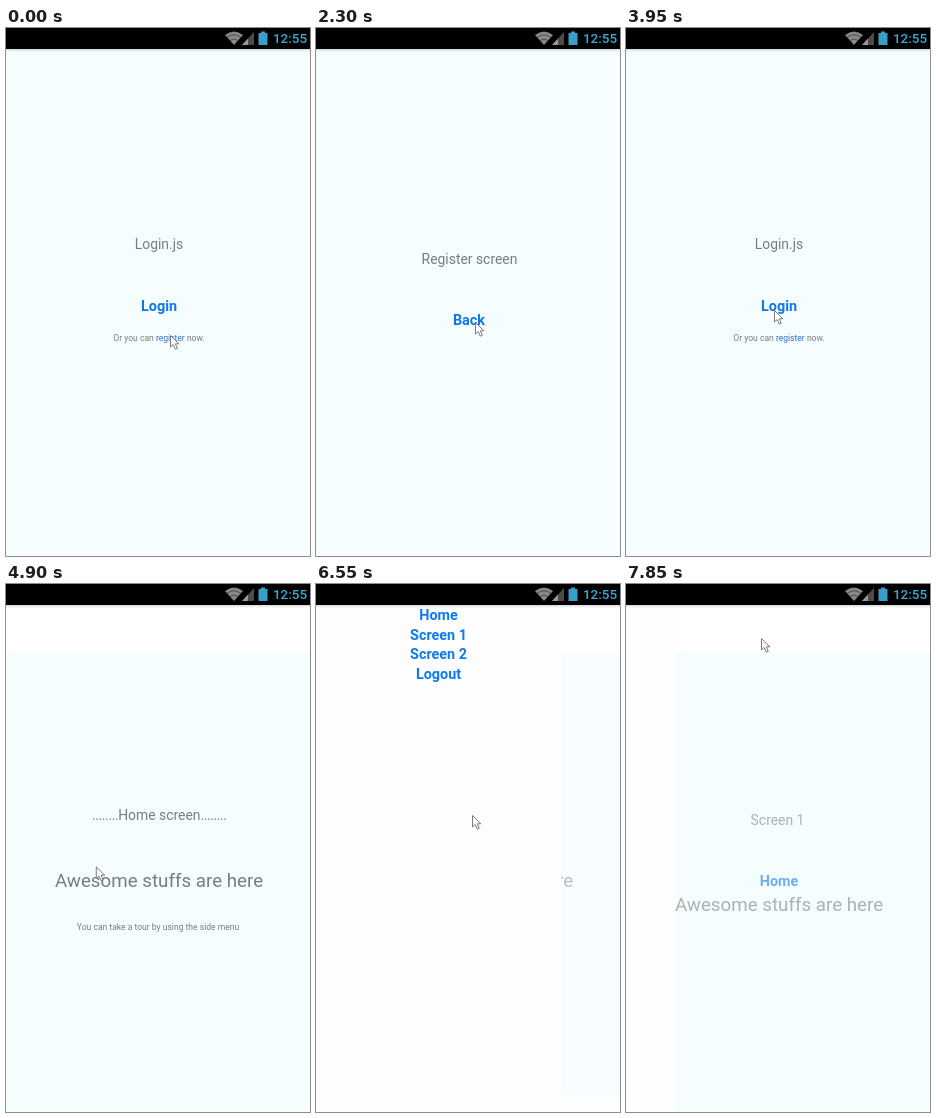
Recreate the animation shown at these times as an HTML page. Size 304 by 528 pixels, loop 8 s.

```html
<!DOCTYPE html>
<html lang="en">
<head>
<meta charset="utf-8">
<title>Login flow</title>
<style>
  html, body { margin: 0; width: 100%; height: 100%; overflow: hidden; background: #fff; }
  svg { display: block; width: 304px; height: 528px; }
  text { font: 13.9px Roboto, sans-serif; fill: #797d7d; text-anchor: middle; }
  .big { font-size: 18.75px; }
  .small { font-size: 8.55px; }
  .link { font-size: 14.4px; font-weight: 700; fill: #0f77e6; }
  #menu .link { fill: #0c7bf2; }
  .inline { fill: #2f70c8; }
  .dots { letter-spacing: -.4px; }
  #clock { font-size: 13.5px; font-weight: 500; fill: #38a8d4; text-anchor: end; }
</style>
</head>
<body>
<svg viewBox="0 0 304 528">
  <defs>
    <linearGradient id="shade" x2="0" y2="1">
      <stop stop-color="#8f9394" stop-opacity=".35"/>
      <stop offset="1" stop-color="#8f9394" stop-opacity="0"/>
    </linearGradient>
  </defs>
  <rect width="304" height="528" fill="#fff"/>

  <g id="main">
    <rect width="304" height="528" fill="#f5fdff"/>
    <rect id="header" y="20" width="304" height="48" fill="#fff"/>
    <g id="login">
      <text x="153" y="221">Login.js</text>
      <text x="153" y="283" class="link">Login</text>
      <text x="153" y="313" class="small">Or you can <tspan class="inline">register</tspan> now.</text>
    </g>
    <g id="register">
      <text x="153.5" y="236">Register screen</text>
      <text x="153" y="297.300" class="link">Back</text>
    </g>
    <g id="home">
      <text x="153.300" y="236.300"><tspan class="dots">........</tspan>Home screen<tspan class="dots">........</tspan></text>
      <text x="153" y="303" class="big">Awesome stuffs are here</text>
      <text x="152" y="346.300" class="small">You can take a tour by using the side menu</text>
    </g>
    <g id="screen1">
      <text x="151.5" y="241">Screen 1</text>
      <text x="153" y="302" class="link">Home</text>
      <text x="153" y="326.500" class="big">Awesome stuffs are here</text>
    </g>
  </g>

  <g id="menu">
    <rect y="20" width="245" height="508" fill="#fefefe"/>
    <text x="122.5" y="36" class="link">Home</text>
    <text x="122.5" y="55.5" class="link">Screen 1</text>
    <text x="122.5" y="75" class="link">Screen 2</text>
    <text x="122.5" y="94.5" class="link">Logout</text>
  </g>

  <rect width="304" height="21" fill="#000"/>
  <rect y="21" width="304" height="3" fill="url(#shade)"/>
  <path d="M228 17L219 7Q228 0 237 7Z" fill="#888"/>
  <path d="M221 9.500Q228 4 235 9.500M224 12.500Q228 9.500 232 12.500" fill="none" stroke="#333" stroke-width=".7"/>
  <path d="M236 17L248 4V17Z" fill="#4c4c4c"/>
  <path d="M236 17L242 10.500V17Z" fill="#999"/>
  <path d="M255 3.500h4v1.500h2.500V17h-9V5h2.500Z" fill="#3a9fc8"/>
  <text id="clock" x="301.200" y="15.300">12:55</text>

  <path id="cursor" d="M0 0V11.500L2.700 9L4.800 13.700L6.800 12.800L4.800 8.300H8.400Z" fill="#fff" stroke="#6c6c6c" stroke-width=".9"/>
</svg>
<script>
const LOOP = 8000, DRAWER = 245, BURST = 350, STEP = 100;
const $ = id => document.getElementById(id);
const screens = ["login", "register", "login", "home", "screen1"];

const origin = { x: 164, y: 307 };
const moves = [
  { start: 2050, end: 2300, x: 159, y: 294 }, // to Back
  { start: 3150, end: 3950, x: 148, y: 282 }, // to Login
  { start: 4500, end: 5400, x: 17, y: 283 },  // to the left edge
  { start: 5600, end: 6050, x: 239, y: 302 }, // drag the drawer open
  { start: 6350, end: 6500, x: 156, y: 231 },
  { start: 6500, end: 7200, x: 135, y: 54 }   // to Screen 1
];

const ramp = (t, start, end) => Math.min(1, Math.max(0, (t - start) / (end - start)));

// The picture updates in short bursts: three steps, then a hold.
function quantize(time) {
  const phase = time % BURST;
  return time - phase + Math.min(2, Math.floor(phase / STEP)) * STEP;
}

function pointerAt(t) {
  return moves.reduce((p, m) => {
    const k = ramp(t, m.start, m.end);
    return { x: p.x + (m.x - p.x) * k, y: p.y + (m.y - p.y) * k };
  }, origin);
}

const drawerAt = t =>
  219 * ramp(t, 5600, 6050) + 26 * ramp(t, 6100, 6300) - DRAWER * ramp(t, 7600, 7850);

// Whole numbers are screens, fractions are fades between them.
const routeAt = t =>
  ramp(t, 1400, 1650) + ramp(t, 2700, 2950) + ramp(t, 4100, 4350) + ramp(t, 7600, 7910);

function render(time) {
  const t = quantize(time);
  const { x, y } = pointerAt(t);
  const edge = drawerAt(t), route = routeAt(t);
  const from = Math.floor(route), mix = route - from;

  for (const id of screens) $(id).style.opacity = 0;
  $(screens[from]).style.opacity = Math.max(0, 1 - 1.6 * mix);
  if (mix > 0) $(screens[from + 1]).style.opacity = mix;

  $("header").style.opacity = ramp(route, 2, 3);
  $("main").style.opacity = 1 - edge / DRAWER / 2;
  $("menu").setAttribute("transform", `translate(${edge - DRAWER} 0)`);
  $("cursor").setAttribute("transform", `translate(${x + 0.5} ${y + 0.5})`);
}

const start = performance.now();
function frame() {
  render((performance.now() - start) % LOOP);
  requestAnimationFrame(frame);
}
frame();
</script>
</body>
</html>
```
